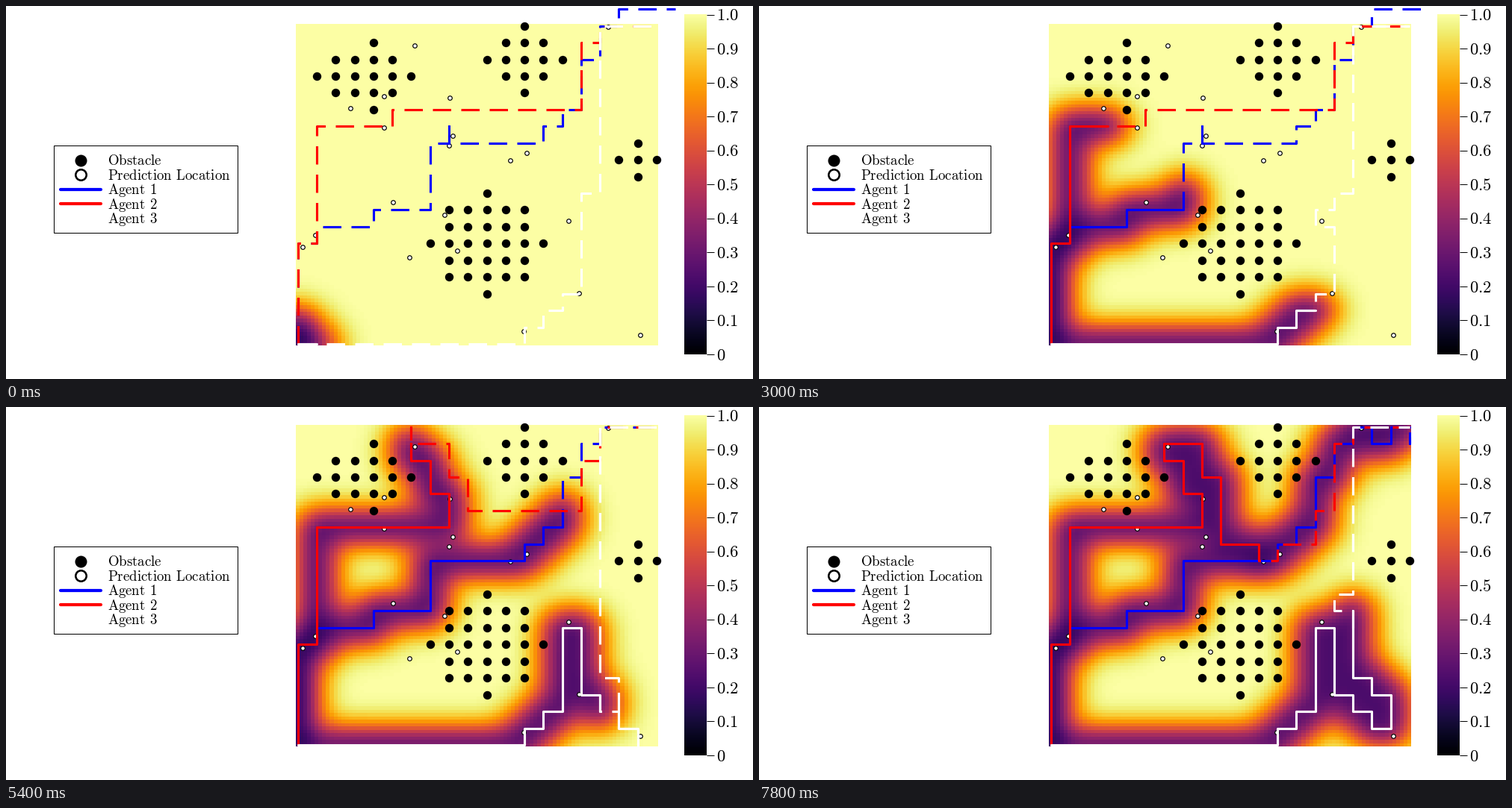
Animation, 1000 px wide and 500 px high, one loop 8000 ms. Source, as a matplotlib script:

```python
import numpy as np
import matplotlib.pyplot as plt
from matplotlib.animation import FuncAnimation
from matplotlib.patches import Rectangle

plt.rcParams.update({
    "mathtext.fontset": "cm",
    "lines.scale_dashes": False,
    "path.simplify": False,
})

W, H, DPI = 1000, 500, 100
PT = 72 / DPI                # points per pixel
FRAMES, INTERVAL = 40, 200
LEFT, RIGHT, TOP, BOTTOM = 388.4, 873.4, 24.4, 455.2
SIZE, STEP = 20, 0.2         # grid nodes per side, heat cell size
SPAN = SIZE - 1 + STEP       # grid units across the map
LENGTH_SCALE, NOISE = 1.35, 1.0
COLORS = ["blue", "red", "white"]
MOVES = {"U": (0, 1), "D": (0, -1), "L": (-1, 0), "R": (1, 0)}


def px(i):
    return LEFT + (i + STEP / 2) * (RIGHT - LEFT) / SPAN


def py(j):
    return BOTTOM - (j + STEP / 2) * (BOTTOM - TOP) / SPAN


def walk(start, moves):
    """Follow moves such as 'U6 R' and return every node passed."""
    steps = [start]
    for move in moves.split():
        steps += [MOVES[move[0]]] * int(move[1:] or 1)
    return np.cumsum(steps, axis=0)


# Routes actually walked, one grid step per frame
ROUTES = [walk((0, 0), moves) for moves in (
    "U6 R U R3 U R3 U3 R5 U R U R U3 R U2 R U R D R U R",
    "U6 R U7 R7 U2 L U2 L U R2 D2 R D4 R2 D",
    "R12 U R U R U5 R D4 R D R D R U2 L U L U4")]

# Plans: (first frame, step where the plan leaves the route, moves after it)
PLANS = [
    [(0, 18, "U R U D R5 U R U R U3 R U2 R U R3"),
     (17, 36, "R2"),
     (37, 39, "R D U")],
    [(0, 18, "U R10 U4 R U R3"),
     (17, 28, "D R D2 R2 D R6 U3 R U2 R3"),
     (25, 28, "U D R2 D2 R D2 R6 U3 R U2 R3"),
     (28, 37, "L R6 U2 R U3 R U2 R3"),
     (37, 39, "D R U R2 U2 R U4 R U R3")],
    [(0, 17, "R U6 R U10 R3"),
     (11, 17, "R U4 L U R U R U10 R3"),
     (17, 31, "D U L U L U17 R3"),
     (25, 31, "D U L U3 L U15 R3"),
     (28, 39, "U L U R U10 R3")],
]


def planned(agent, step):
    route = ROUTES[agent]
    _, leave, moves = [p for p in PLANS[agent] if p[0] <= step][-1]
    return np.vstack([route[step:leave], walk(tuple(route[leave]), moves)])


CELLS = np.arange(0, SIZE - 1 + STEP / 2, STEP)


def kernel(a, b):
    return np.exp(-(a[:, None] - b[None, :]) ** 2 / (2 * LENGTH_SCALE ** 2))


def variance(step):
    """Posterior variance of a Gaussian process sampled along the routes."""
    x, y = np.vstack([r[:step + 2] for r in ROUTES]).T
    gram = kernel(x, x) * kernel(y, y) + NOISE * np.eye(len(x))
    cross = kernel(CELLS, y)[:, None, :] * kernel(CELLS, x)[None, :, :]
    cross = cross.reshape(-1, len(x))
    gain = np.linalg.solve(gram, cross.T).T
    return (1 - (cross * gain).sum(axis=1)).reshape(len(CELLS), len(CELLS))


fig = plt.figure(figsize=(W / DPI, H / DPI), dpi=DPI, facecolor="white")
ax = fig.add_axes([0, 0, 1, 1])
ax.axis("off")


def image(data, extent):
    return ax.imshow(data, cmap="inferno", vmin=0, vmax=1, origin="lower",
                     extent=extent, aspect="auto", interpolation="nearest")


def dots(x, y, size, face, edge=0):
    ax.scatter(x, y, s=((size - edge) * PT) ** 2, facecolor=face,
               edgecolor="black", linewidth=edge * PT, zorder=3)


def stroke(x, y, color, width, z=2):
    return ax.plot(x, y, color=color, lw=width * PT, zorder=z,
                   solid_capstyle="round", solid_joinstyle="round")[0]


def label(x, y, text, size):
    words = [r"\mathrm{%s}" % w for w in text.split()]
    ax.text(x, y, "$" + r"\hspace{0.38}".join(words) + "$",
            fontsize=size * PT, va="baseline", ha="left")


heat = image(variance(0), (LEFT, RIGHT, BOTTOM, TOP))
image(np.linspace(0, 1, 256)[:, None], (908, 938, 467, 11.5))

# Obstacles fill small discs (column, row, radius)
DISCS = [(4, 16, 2), (2, 16, 1), (12, 17, 2), (18, 11, 1), (10, 6, 3)]
col, row = np.meshgrid(np.arange(SIZE), np.arange(SIZE))
blocked = np.any([(col - i) ** 2 + (row - j) ** 2 <= r * r
                  for i, j, r in DISCS], axis=0)
dots(px(col[blocked]), py(row[blocked]), 11.4, "black")

# Scattered prediction locations, in pixels
SITES = [(547, 53), (506, 121), (461, 137), (506, 163), (594, 123),
         (598, 174), (593, 187), (675, 207), (697, 197), (806, 28),
         (518, 263), (587, 280), (414, 307), (397, 323), (604, 328),
         (540, 337), (753, 288), (767, 385), (693, 436), (849, 441)]
dots(*np.transpose(SITES), 6.8, "white", 1.2)

solid, dashed = [], []
for k, color in enumerate(COLORS):
    solid.append(stroke([], [], color, 3.1, 4 + k / 10))
    dashed.append(stroke([], [], color, 3.1, 4.05 + k / 10))
    dashed[-1].set_linestyle((0, (24.5 * PT, 13.5 * PT)))

# Colour scale
for k in range(11):
    y = 467 - 45.55 * k
    ax.plot([938, 947.5], [y, y], color="black", lw=PT,
            solid_capstyle="butt")
    label(951, y + 7.7, f"{k / 10:.1f}" if k else "0", 22.5)

# Legend
ax.add_patch(Rectangle((63.5, 186.5), 246, 117, fc="white", ec="black",
                       lw=PT))
rows = 206.8 + 19.5 * np.arange(5)
names = ["Obstacle", "Prediction Location"]
names += [f"Agent {k}" for k in (1, 2, 3)]
for y, name in zip(rows, names):
    label(136.3, y + 6.4, name, 18.9)
dots(100, rows[0], 16, "black")
dots(100, rows[1], 17, "white", 2.6)
for y, color in zip(rows[2:], COLORS):
    stroke([73, 127], [y, y], color, 4.2)

ax.set_xlim(0, W)
ax.set_ylim(H, 0)


def draw(step):
    heat.set_data(variance(step))
    for k in range(3):
        for line, nodes in ((solid[k], ROUTES[k][:step + 2]),
                            (dashed[k], planned(k, step))):
            x, y = nodes.T
            line.set_data(px(x), py(y))
    return [heat, *solid, *dashed]


anim = FuncAnimation(fig, draw, frames=FRAMES, interval=INTERVAL,
                     init_func=lambda: draw(0), repeat=True)
plt.show()
```
